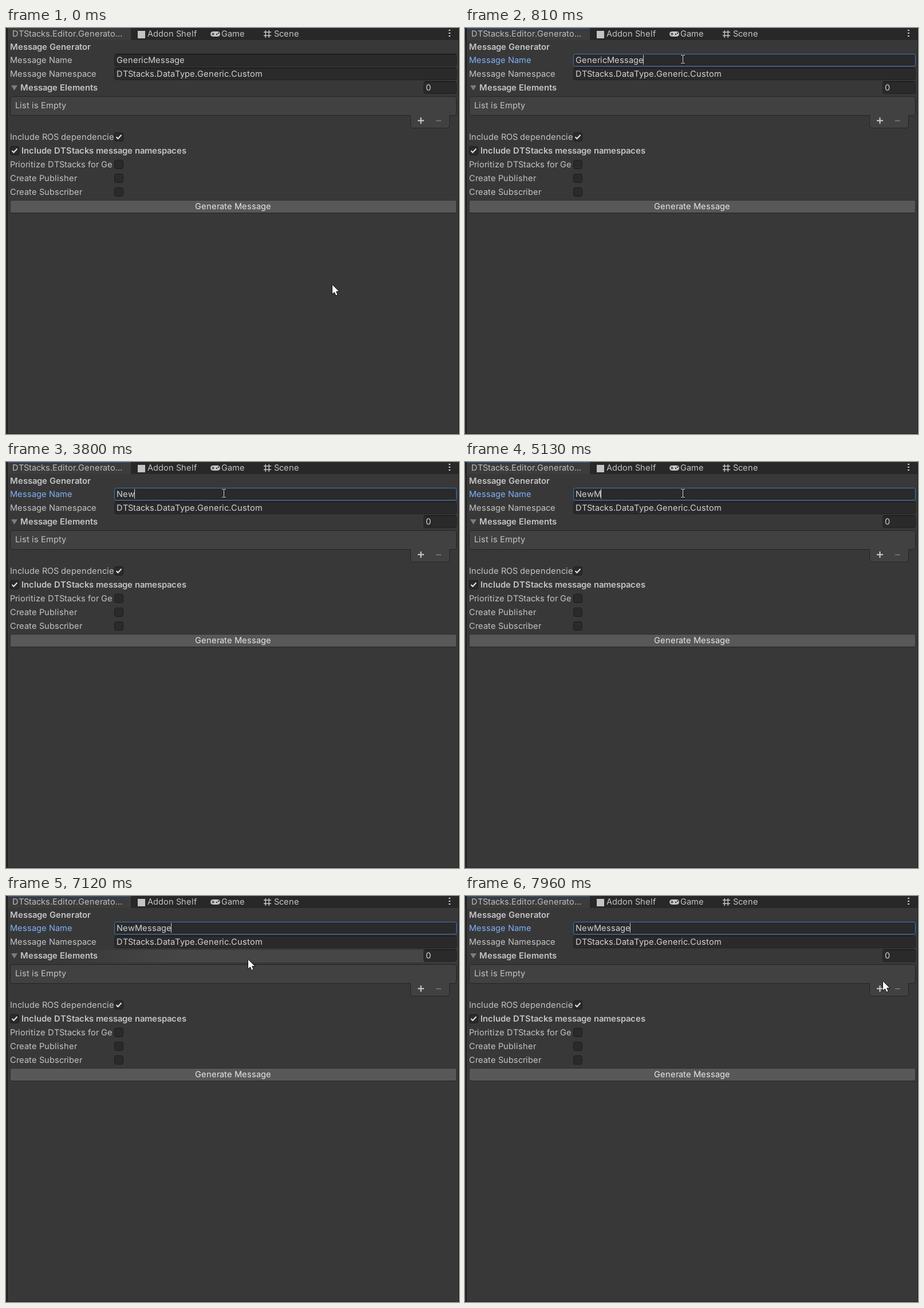
Animation, 791 px wide and 708 px high, one loop 8000 ms. Source, as an HTML page with a canvas:

```html
<!DOCTYPE html>
<html lang="en">
<head>
<meta charset="utf-8">
<title>Message Generator</title>
<style>
html, body { margin: 0; width: 100%; height: 100%; overflow: hidden; background: #383838; }
canvas { display: block; }
</style>
</head>
<body>
<canvas id="stage" width="791" height="708"></canvas>
<script>
const ctx = document.getElementById('stage').getContext('2d');
const LOOP = 8000;
const GREY = '#c4c4c4';

// Pointer positions, one per step
const approach = [[563, 436], [542, 390], [500, 305], [452, 205], [412, 108], [389, 63], [380, 54]];
const leave = [[384, 60], [401, 85], [423, 111], [455, 126], [500, 134], [547, 137], [592, 137], [632, 135],
  [666, 132], [695, 128], [718, 124], [735, 121], [735, 130], [732, 141], [730, 149]];
const typed = 'NewMessage';
const keyTimes = [3400, 3600, 3800, 5130, 5330, 5660, 5760, 5850, 6060, 6130];

function rect(x, y, w, h, color) {
  ctx.fillStyle = color;
  ctx.fillRect(x, y, w, h);
}

function box(x, y, w, h, fill, border, radius = 3) {
  ctx.beginPath();
  ctx.roundRect(x + .5, y + .5, w - 1, h - 1, radius);
  ctx.fillStyle = fill;
  ctx.fill();
  ctx.strokeStyle = border;
  ctx.lineWidth = 1;
  ctx.stroke();
}

function line(points, color, width) {
  ctx.beginPath();
  points.forEach(p => ctx.lineTo(...p));
  ctx.strokeStyle = color;
  ctx.lineWidth = width;
  ctx.stroke();
}

function polygon(points, color) {
  ctx.beginPath();
  points.forEach(p => ctx.lineTo(...p));
  ctx.closePath();
  ctx.fillStyle = color;
  ctx.fill();
}

function setFont(bold) {
  ctx.font = `${bold ? '600 14.8px' : '400 14.6px'} Inter, sans-serif`;
  ctx.textRendering = 'geometricPrecision';
}

// The editor places glyphs on whole-pixel advances
const advance = ch => Math.round(ctx.measureText(ch).width);

function textWidth(str) {
  setFont(false);
  return [...str].reduce((sum, ch) => sum + advance(ch), 0);
}

function text(str, x, y, color = GREY, bold = false) {
  setFont(bold);
  ctx.fillStyle = color;
  for (const ch of str) {
    ctx.fillText(ch, x, y);
    x += advance(ch);
  }
}

function field(x, y, w, border = '#212121') {
  box(x, y, w, 22, '#2a2a2a', border);
  if (border === '#212121') rect(x + 2, y, w - 4, 1, '#0f0f0f');
}

function checkbox(x, y, on) {
  box(x, y, 16, 16, '#2a2a2a', '#1c1c1c');
  if (on) line([[x + 3.5, y + 8], [x + 6.5, y + 11], [x + 12.5, y + 4.5]], '#e4e4e4', 2);
}

function tabs(focused) {
  rect(0, 0, 791, 21, '#282828');
  rect(3, 0, 215, 21, '#3c3c3c');
  if (focused) rect(3, 0, 215, 1, '#31599a');
  text('DTStacks.Editor.Generato...', 11, 15, '#bdbdbd');
  text('Addon Shelf', 247, 15);
  text('Game', 376, 15);
  text('Scene', 468, 15);

  rect(230, 5, 13, 13, GREY);

  box(357, 6, 17, 9, GREY, GREY, 4);
  rect(359, 10, 5, 1, '#282828');
  rect(361, 8, 1, 5, '#282828');
  rect(367, 10, 2, 2, '#282828');
  rect(370, 8, 2, 2, '#282828');

  for (const d of [0, 6]) {
    rect(452.5 + d, 4, 1.5, 13, GREY);
    rect(450, 6.5 + d, 13, 1.5, GREY);
  }
  for (const y of [3, 8, 13]) rect(773, y, 3, 2, GREY);
}

function arrow(x, y) {
  ctx.save();
  ctx.translate(x, y);
  const shape = [[0, 0], [0, 15.5], [3.6, 12.3], [6.2, 18], [8.6, 17], [6.1, 11.3], [11, 11]];
  line([...shape, shape[0]], '#000', 1.4);
  polygon(shape, '#fff');
  ctx.restore();
}

function beam(x, y) {
  const parts = [[0, -6, 1, 13], [-3, -7, 3, 1], [1, -7, 3, 1], [-3, 7, 3, 1], [1, 7, 3, 1]];
  for (const [dx, dy, w, h] of parts) rect(x + dx - 1, y + dy - 1, w + 2, h + 2, '#1c1c1c');
  for (const [dx, dy, w, h] of parts) rect(x + dx, y + dy, w, h, '#e8e8e8');
}

function pointer(t) {
  if (t < 70) return [570, 448];
  if (t < 6990) return approach[Math.min(6, Math.floor((t - 70) / 68.3))];
  return leave[Math.min(14, Math.floor((t - 6978) / 69.3))];
}

function draw(t) {
  const [px, py] = pointer(t);
  const over = (top, bottom) => px > 189 && px < 729 && py >= top && py < bottom;
  const focused = t >= 680;
  const selected = t >= 2610 && t < 3400;
  const name = t < 3400 ? 'GenericMessage' : typed.slice(0, keyTimes.filter(k => k <= t).length);
  const edge = top => over(top, top + 22) ? '#656565' : '#212121';

  rect(0, 0, 791, 708, '#383838');
  tabs(focused);

  if (over(93, 117)) {
    const glow = ctx.createLinearGradient(90, 0, 300, 0);
    glow.addColorStop(0, '#383838');
    glow.addColorStop(1, '#464646');
    rect(90, 94, 697, 22, glow);
  }

  text('Message Generator', 7, 38, GREY, true);
  text('Message Name', 7, 61, focused ? '#7fb0f8' : GREY);
  field(189, 45, 598, focused ? '#3a79bb' : edge(45));
  if (selected) rect(193, 47, 118, 17, '#3a67a6');
  text(name, 193, 61, '#d2d2d2');
  if (t >= 810 && !selected) rect(192 + textWidth(name), 47, 1, 17, '#d0d0d0');

  text('Message Namespace', 7, 85);
  field(189, 69, 598, edge(69));
  text('DTStacks.DataType.Generic.Custom', 193, 85, '#d2d2d2');

  polygon([[9, 100], [20, 100], [14.5, 109]], '#7c7c7c');
  text('Message Elements', 25, 109, GREY, true);
  field(729, 93, 58);
  text('0', 733, 109, '#d2d2d2');

  box(706, 145, 69, 30, '#414141', '#242424', 4);
  box(7, 119, 780, 34, '#414141', '#242424', 4);
  rect(707, 151, 67, 3, '#414141');
  text('List is Empty', 16, 140);
  rect(719, 160.5, 11, 2, '#d0d0d0');
  rect(723.5, 156, 2, 11, '#d0d0d0');
  rect(751, 161, 9, 1.5, '#7c7c7c');

  text('Include ROS dependencie', 7, 195);
  checkbox(189, 182, true);
  checkbox(7, 206, true);
  text('Include DTStacks message namespaces', 27, 219, GREY, true);
  text('Prioritize DTStacks for Ge', 7, 243);
  text('Create Publisher', 7, 267);
  text('Create Subscriber', 7, 291);
  for (const y of [230, 254, 278]) checkbox(189, y, false);

  box(7, 300, 780, 23, '#585858', '#303030');
  rect(9, 322, 776, 1, '#242424');
  const label = 'Generate Message';
  text(label, Math.round(396 - textWidth(label) / 2), 316, '#e6e6e6');

  rect(1, 0, 2, 708, '#1d1d1d');
  rect(790, 0, 1, 708, '#1d1d1d');
  rect(0, 707, 791, 1, '#242424');

  const overField = over(45, 67) || over(69, 91);
  (overField ? beam : arrow)(px, py);
}

function tick(now) {
  draw(now % LOOP);
  requestAnimationFrame(tick);
}
requestAnimationFrame(tick);
</script>
</body>
</html>
```
